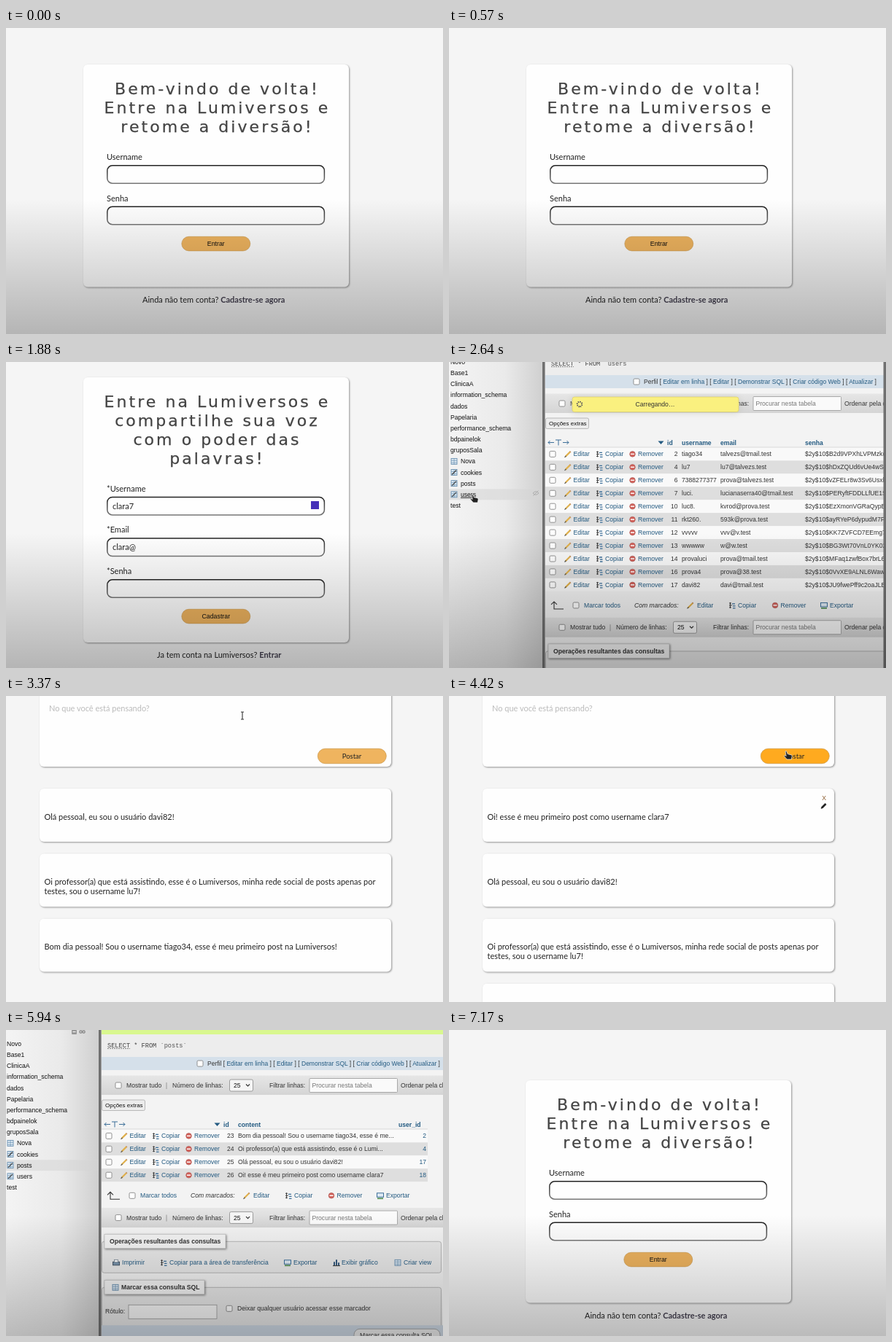
An HTML page that plays this animation: 599x420 px, repeating every 7.25 s.

```html
<!DOCTYPE html>
<html lang="pt">
<head>
<meta charset="utf-8">
<title>Demo</title>
<style>
html, body { margin: 0; width: 100%; height: 100%; overflow: hidden; background: #f5f5f5; }
svg { display: block; width: 599px; height: 420px; }
text { fill: #222; white-space: pre; }
.b { font: 11px Lato, sans-serif; }
.h { font: 22px "DejaVu Sans", sans-serif; letter-spacing: 3.05px; fill: #444; stroke: #444; stroke-width: .25px; text-anchor: middle; }
.a { font: 8.6px "Liberation Sans", sans-serif; fill: #333; }
.l { fill: #235a81; }
.s { font-weight: bold; }
.d { fill: #111; }
.i { font-style: italic; }
.k { font: 8.65px "Liberation Mono", monospace; fill: #444; }
.n { font: 8.9px "Noto Sans", sans-serif; fill: #d8d9de; }
.o { font: 600 8.4px "Open Sans", sans-serif; fill: #d6d6d6; }
.mid { text-anchor: middle; }
.end { text-anchor: end; }
.card { fill: #fefefe; filter: drop-shadow(1px 1.5px 1px #0006); }
.legend { fill: #f4f4f4; stroke: #bbb; stroke-width: .6; filter: drop-shadow(1px 1.5px 1.5px #0007); }
#spin { transform-origin: 179px 58px; animation: spin 800ms steps(8) infinite; }
@keyframes spin { to { transform: rotate(360deg); } }
</style>
</head>
<body>
<svg id="stage" viewBox="0 0 599 420"></svg>
<script>
const LOOP = 7250;
const SITE = 'Lumiversos';
const USER = 'clara7';
const POST = `Oi! esse é meu primeiro post como username ${USER}`;

const text = (x, y, s, cls = 'a', more = '') => `<text x="${x}" y="${y}" class="${cls}" ${more}>${s}</text>`;
const box = (x, y, w, h, fill, more = '') =>
  `<rect x="${x}" y="${y}" width="${w}" height="${h}" fill="${fill}" ${more}/>`;
const path = (d, stroke, w = 1, more = '') =>
  `<path d="${d}" fill="none" stroke="${stroke}" stroke-width="${w}" ${more}/>`;
const at = (x, y, s) => `<g transform="translate(${x} ${y})">${s}</g>`;
const during = (from, to, s) => `<g data-from="${from}" data-to="${to}">${s}</g>`;
const check = (x, y) => box(x - 4, y - 4, 8, 8, '#fff', 'rx="1.5" stroke="#777" stroke-width=".8"');
const shade = box(-2, 235, 605, 190, 'url(#shade)');

const icons = {
  pencil: path('M-3.5 3.5L3 -3', '#e0b04c', 2.2) + path('M-4.5 4.5L-2.5 2.5', '#555', 1.2) + path('M2.5 -4L4 -2.5', '#c08a5a', 1.3),
  copy: path('M-4 -3H-1M-4 0H0M-4 3H-1M-2.5 -4V4', '#444', 1) + path('M0 -2H4M1 1H4.5M1 4H4.5', '#3d6f99', 1.3),
  remove: '<circle r="3.8" fill="#d2625b" stroke="#a8554f" stroke-width=".6"/>' + path('M-2.5 0H2.5', '#fff', 1.5),
  out: box(-4.5, -3.5, 9, 5.5, '#dfeaf4', 'stroke="#3d6f99"') + path('M-4 4H4', '#4a8a4a', 1.6),
  print: box(-4.5, -1, 9, 4.5, '#7893ab', 'stroke="#456"') + box(-2.5, -4, 5, 3.5, '#fff', 'stroke="#678" stroke-width=".7"'),
  chart: path('M-3 4V-1M0 4V-4M3 4V0', '#35597d', 2) + path('M-5 4.3H5', '#333', 1),
  grid: box(-4, -4, 8, 8, '#dce8f2', 'stroke="#5d87aa" stroke-width=".8"') + path('M-4 -1H4M-4 2H4M0 -4V4', '#5d87aa', .6),
};
const icon = (name, x, y) => at(x, y, icons[name]);
const action = (name, ix, tx, y, s, cls = 'a l') => icon(name, ix, y) + text(tx, y + 3, s, cls);

const hand = '<path d="M-3 -6q1.2 -1 2 .3l1.2 3.4 4.6 1q1.5 .5 1.3 2l-.8 4.3h-6l-4 -4.5q0 -1.4 1.8 -.8l1.1 .7z" fill="#222" stroke="#fff" stroke-width=".7"/>';
const beam = path('M-2 -5H2M-2 5H2M0 -5V5', '#333', 1.1);
const arrow = '<path d="M0 0V10L2.4 7.8 4 11.5 5.6 10.8 4 7.3H7.2z" fill="#222" stroke="#fff" stroke-width=".7"/>';

// Forms
const heading = (y, lines) => lines.map((s, i) => text(289.5, y + 26 * i, s, 'h')).join('');
const field = (y, label) => text(138, y, label, 'b')
  + box(138.8, y + 7.8, 297.6, 24.4, '#fefefe', 'rx="7" stroke="url(#rim)" stroke-width="1.5"');
const button = (y, s) => box(240.8, y, 94, 19.6, '#efb45f', 'rx="9.8" stroke="#c9974a" stroke-width=".6"')
  + text(287.8, y + 13, s, 'a d mid', 'style="font-size:8.8px"');
const footer = (x, y, s, link) => text(x, y, `${s} <tspan font-weight="bold" fill="#444050">${link}</tspan>`, 'b');
const formPage = s => box(-2, -22, 605, 445, '#f5f5f5') + s + shade;

const login = formPage(box(106, 50, 364, 305.5, '#fff', 'rx="6" class="card"')
  + heading(91, ['Bem-vindo de volta!', `Entre na ${SITE} e`, 'retome a diversão!'])
  + field(181, 'Username') + field(237.5, 'Senha') + button(286.3, 'Entrar')
  + footer(187, 377, 'Ainda não tem conta?', 'Cadastre-se agora'));

const hints = ['tiago34', 'lu7', 'luciana', 'lucianaprova', 'davi82', 'asdfasdfasfasf asdf asdf as…'];
const autofill = box(138, 210, 300, 66, '#2b2f3c', 'rx="2"')
  + text(144, 226.5, 'Desbloqueie sua', 'n') + text(416, 226.5, 'preenchimento', 'n end') + text(144, 240.5, 'automático', 'n')
  + path('M138 249.5H438', '#454a5a', .8)
  + box(149.5, 261, 7.5, 6, 'none', 'rx="1" stroke="#7c7fd6"') + path('M151 261v-2q2 -3.5 4.3 0v2', '#7c7fd6')
  + text(163, 266.5, 'Desbloquear conta', 'n', 'style="font-size:10.5px;font-weight:bold;fill:#8084e0"')
  + '<path d="M210 217L216 211L222 217z" fill="#191919"/>' + box(202, 216, 155, 146, '#191919', 'rx="4"')
  + hints.map((s, i) => text(210, 233.7 + 23.5 * i, s, 'o')).join('');

const signup = formPage(box(106, 21, 364, 364, '#fff', 'rx="6" class="card"')
  + heading(62, [`Entre na ${SITE} e`, 'compartilhe sua voz', 'com o poder das', 'palavras!'])
  + field(177.7, '*Username') + field(234.3, '*Email') + field(291, '*Senha') + button(339.3, 'Cadastrar')
  + footer(207, 406, `Ja tem conta na ${SITE}?`, 'Entrar')
  + box(418, 191, 11, 11, '#4530b8')
  + text(146, 201.5, '', 'b', 'id="name"') + text(146, 258, '', 'b', 'id="mail"') + text(146, 315, '', 'b', 'id="pass"')
  + during(1050, 1530, autofill));

// Feed
const posts = [
  ['Olá pessoal, eu sou o usuário davi82!'],
  [`Oi professor(a) que está assistindo, esse é o ${SITE}, minha rede social de posts apenas por`, 'testes, sou o username lu7!'],
  [`Bom dia pessoal! Sou o username tiago34, esse é meu primeiro post na ${SITE}!`],
];
const post = (lines, i) => {
  const y = 127 + 89.2 * i;
  return box(46, y, 482, 73, '#fff', 'rx="6" class="card"')
    + lines.map((s, j) => text(52.5, y + 43 + 13 * j, s, 'b')).join('');
};
const list = items => items.map(post).join('');
const own = text(514, 142.5, 'X', 'a mid', 'style="fill:#8a5a2a"')
  + path('M511 153.5L516.5 148', '#222', 2.6) + path('M510 154.5L512 152.5', '#222', 1.2);
const send = fill => box(427.3, 72.3, 94, 20.4, fill, 'rx="10.2" stroke="#c9974a" stroke-width=".7"')
  + text(474, 86, 'Postar', 'b mid', 'style="font-size:9.5px"');

const feed = box(0, 0, 599, 420, '#f5f5f5') + box(46, -20, 482, 117, '#fff', 'rx="6" class="card"')
  + text(59, 20.7, '', 'b', 'id="draft"')
  + during(0, 4250, send('#efb45f')) + during(4250, LOOP, send('#ffaa1f'))
  + during(0, 4350, list(posts)) + during(4350, LOOP, list([[POST], ...posts]) + own)
  + `<g id="pointer">${during(0, 4130, beam)}${during(4130, 4250, arrow)}${during(4250, LOOP, hand)}</g>`;

// Database browser
let seed = 7;
const rand = n => (seed = seed * 16807 % 2147483647) % n;
const CHARS = 'ABCDEFGHJKLMNPQRSTUVWXYZabcdefghkmnopqrstuvwxyz0123456789';
const hash = () => '$2y$10$' + Array.from({ length: 20 }, () => CHARS[rand(CHARS.length)]).join('');

const tree = ['Novo', 'Base1', 'ClinicaA', 'information_schema', 'dados', 'Papelaria', 'performance_schema',
  'bdpainelok', 'gruposSala', 'Nova', 'cookies', 'posts', 'users', 'test'];
const sidebar = active => box(-2, -22, 131, 445, 'url(#side)')
  + box(91, -20, 7, 7, '#999', 'rx="1"') + path('M92.5 -16.5H96.5', '#fff')
  + path('M102 -18h3v3h-3zM106 -18h3v3h-3z', '#777')
  + tree.map((s, i) => {
    const y = 15.15 * i, leaf = i > 8 && i < 13, on = s === active;
    return (on ? box(0, y - 7.5, 128, 15, '#d6d6d6', 'opacity=".55"') : '')
      + (leaf ? icon('grid', 7, y) + (i > 9 ? path(`M4 ${y + 3}L10 ${y - 3}`, '#444', 1.2) : '') : '')
      + text(leaf ? 16 : 2, y + 3, s, 'a d', on && s === 'users' ? 'text-decoration="underline"' : '');
  }).join('') + box(128, -22, 3.6, 445, '#707070');

const filterBar = y => box(132, y - 13.5, 470, 27, 'url(#bar)') + check(155, y) + text(166, y + 3, 'Mostrar tudo')
  + path(`M221 ${y - 4}V${y + 5}`, '#888', .8) + text(229, y + 3, 'Número de linhas:')
  + box(307.5, y - 8, 32, 16, '#f5f5f5', 'rx="2" stroke="#888" stroke-width=".8"') + text(313, y + 3, '25', 'a d')
  + path(`M330 ${y - 1.5}l2.5 2.5l2.5 -2.5`, '#333', 1.2)
  + text(362, y + 3, 'Filtrar linhas:') + box(417, y - 9.5, 120.5, 19, '#fafafa', 'rx="1" stroke="#999" stroke-width=".8"')
  + text(420.5, y + 3, 'Procurar nesta tabela', 'a', 'style="fill:#777"') + text(542, y + 3, 'Ordenar pela chave');

const links = ['Editar em linha', 'Editar', 'Demonstrar SQL', 'Criar código Web', 'Atualizar'];
const queryTop = (table, x) => box(132, -22, 470, 9, '#d9f78f') + box(132, -13, 470, 31, '#ededed')
  + text(140, 4.5, `SELECT * FROM <tspan fill="#555">\`${table}\`</tspan>`, 'k') + path('M140 6.5H171', '#666', .8, 'stroke-dasharray="2 1"')
  + box(132, 18, 470, 18, '#d5e0ea') + check(x, 27)
  + text(x + 10, 30, 'Perfil' + links.map(s => ` [ <tspan class="l">${s}</tspan> ]`).join(''), 'a', 'style="font-size:8.5px"');

const tableRow = (cells, i, width) => {
  const y = 126.4 + 17.95 * i;
  return box(132, y - 9, width, 17.95, i % 2 ? '#dedede' : '#f9f9f9') + check(142, y)
    + action('pencil', 163, 170.5, y, 'Editar') + action('copy', 206, 214, y, 'Copiar')
    + action('remove', 251.5, 259, y, 'Remover') + text(313.5, y + 3, cells[0], 'a end')
    + cells.slice(1).map(([x, s, cls = 'a']) => text(x, y + 3, s, cls)).join('');
};

const legend = (y, w) => box(136, y, w, 19.5, '#f4f4f4', 'class="legend"');
const frame = (y, h) => box(132.5, y, 465, h, '#e9e9e9', 'rx="3" stroke="#aaa" stroke-width=".8"');
const results = y => path(`M157 ${y + 5}H144V${y - 5}M140 ${y - 1}L144 ${y - 5}L148 ${y - 1}`, '#333', 1.1)
  + check(174, y) + text(185, y + 3, 'Marcar todos', 'a l') + text(254, y + 3, 'Com marcados:', 'a i')
  + action('pencil', 331, 340, y, 'Editar') + action('copy', 388, 396, y, 'Copiar')
  + action('remove', 447, 454.5, y, 'Remover') + action('out', 514, 522, y, 'Exportar') + filterBar(y + 30.3)
  + frame(y + 63, 43) + legend(y + 53, 166) + text(143, y + 66, 'Operações resultantes das consultas', 'a s')
  + action('print', 152, 160, y + 92, 'Imprimir') + action('copy', 217, 225, y + 92, 'Copiar para a área de transferência')
  + action('out', 387, 395, y + 92, 'Exportar') + action('chart', 454, 461, y + 92, 'Exibir gráfico')
  + action('grid', 538, 546, y + 92, 'Criar view')
  + frame(y + 126, 90) + legend(y + 116, 137) + icon('grid', 151, y + 126) + text(159, y + 129, 'Marcar essa consulta SQL', 'a s')
  + text(137, y + 162, 'Rótulo:') + box(169, y + 150, 121, 19, '#f8f8f8', 'stroke="#999" stroke-width=".8"')
  + check(307, y + 155) + text(318, y + 158, 'Deixar qualquer usuário acessar esse marcador')
  + box(132, y + 178, 470, 40, '#cfdae6')
  + box(478, y + 183, 118, 18, '#eee', 'rx="8" stroke="#999" stroke-width=".8"') + text(486, y + 194.5, 'Marcar essa consulta SQL');

const table = (heads, rows, width) => box(132, 70, 470, 360, '#f3f3f3')
  + box(132.5, 77, 59, 14.5, '#ececec', 'rx="2" stroke="#aaa" stroke-width=".8"') + text(137, 87, 'Opções extras', 'a d', 'style="font-size:8px"')
  + path('M144 110.5H136M138.5 108L136 110.5L138.5 113M146 107H154M150 107V114.5M156 110.5H164M161.5 108L164 110.5L161.5 113', '#3d6f99', 1)
  + '<path d="M286.5 108.5h8l-4 4.5z" fill="#235a81"/>' + path(`M132 117.2h${width}`, '#bbb', .8)
  + text(299, 113.5, 'id', 'a s l') + heads.map(([x, s]) => text(x, 113.5, s, 'a s l')).join('')
  + rows.map((cells, i) => tableRow(cells, i, width)).join('') + results(136.5 + 17.95 * rows.length);

const browser = (name, linksX, content) => box(-2, -22, 605, 445, '#f3f3f3') + sidebar(name)
  + queryTop(name, linksX) + filterBar(57) + content;

const people = [
  [2, 'tiago34', 'talvezs@tmail.test'], [4, 'lu7', 'lu7@talvezs.test'], [6, '7388277377', 'prova@talvezs.test'],
  [7, 'luci.', 'lucianaserra40@tmail.test'], [10, 'luc8.', 'kvrod@prova.test'], [11, 'rkt260.', '593k@prova.test'],
  [12, 'vvvvv', 'vvv@v.test'], [13, 'wwwww', 'w@w.test'], [14, 'provaluci', 'prova@tmail.test'],
  [16, 'prova4', 'prova@38.test'], [17, 'davi82', 'davi@tmail.test'], [18, USER, 'clara@tmail.test'],
].map(([id, user, mail]) => [id, [319, user], [372, mail], [488, hash()]]);
const userTable = count => table([[319, 'username'], [372, 'email'], [488, 'senha']], people.slice(0, count), 470);

const toast = box(169, 48, 228, 20.5, '#faf07f', 'rx="3" stroke="#d8cc60" stroke-width=".6" style="filter:drop-shadow(0 1px 4px #aa96)"')
  + '<circle id="spin" cx="179" cy="58" r="3.3" fill="none" stroke="#445" stroke-width="2" stroke-dasharray="1.3 1.3"/>'
  + text(282.5, 61, 'Carregando…', 'a mid');
const eye = path('M115 180q4 -4.5 8 0q-4 4.5 -8 0M115.5 183.5L122.5 176.5', '#aaa', .9);

const usersPage = browser('users', 257, during(0, 2780, userTable(11)) + during(2780, LOOP, userTable(12)))
  + box(595.5, -2, 4, 425, '#707070') + shade + eye + during(2500, 2780, toast) + at(34, 188, hand);

const contents = [
  [23, 'Bom dia pessoal! Sou o username tiago34, esse é me...', 2],
  [24, 'Oi professor(a) que está assistindo, esse é o Lumi...', 4],
  [25, 'Olá pessoal, eu sou o usuário davi82!', 17], [26, POST, 18],
].map(([id, s, user]) => [id, [319, s], [577, user, 'a l end']]);
const postsPage = browser('posts', 267, table([[319, 'content'], [539, 'user_id']], contents, 447)) + shade;

const stage = document.getElementById('stage');
stage.innerHTML = `<defs>
  <linearGradient id="shade" x2="0" y2="1"><stop stop-opacity="0"/><stop offset="1" stop-opacity=".27"/></linearGradient>
  <linearGradient id="rim" x2="0" y2="1"><stop stop-color="#222"/><stop offset="1" stop-color="#777"/></linearGradient>
  <linearGradient id="side"><stop stop-color="#f4f4f4"/><stop offset=".6" stop-color="#eaeaea"/><stop offset="1" stop-color="#cfcfcf"/></linearGradient>
  <linearGradient id="bar" x2="0" y2="1"><stop stop-color="#e6e6e6"/><stop offset="1" stop-color="#d4d4d4"/></linearGradient>
</defs>`
  + during(0, 640, login) + during(640, 2330, signup) + during(2330, 3060, usersPage)
  + during(3060, 5190, feed) + during(5190, 6680, at(-1, 19, postsPage)) + during(6680, LOOP, at(-1, 19, login));

const timed = [...stage.querySelectorAll('[data-from]')].map(el => [el, +el.dataset.from, +el.dataset.to]);
const [name, mail, pass, draft, pointer] = ['name', 'mail', 'pass', 'draft', 'pointer'].map(id => document.getElementById(id));
const part = (t, from, to) => Math.min(1, Math.max(0, (t - from) / (to - from)));
const typed = (s, t, from, to) => s.slice(0, Math.round(s.length * part(t, from, to)));

function render() {
  const t = performance.now() % LOOP;
  for (const [el, from, to] of timed) el.style.display = t >= from && t < to ? '' : 'none';
  name.textContent = typed(USER, t, 1530, 1750);
  mail.textContent = typed('clara@tmail.test', t, 1780, 2050);
  pass.textContent = typed('••••••', t, 2080, 2260);
  const draftText = t < 4350 ? typed(POST, t, 3440, 4100) : '';
  draft.textContent = draftText || 'No que você está pensando?';
  draft.style.fill = draftText ? '#222' : '#bbb';
  const p = part(t, 4130, 4280), e = p * p * (3 - 2 * p);
  pointer.setAttribute('transform', `translate(${324 + 140 * e} ${27 + 55 * e})`);
  requestAnimationFrame(render);
}
render();
</script>
</body>
</html>
```
